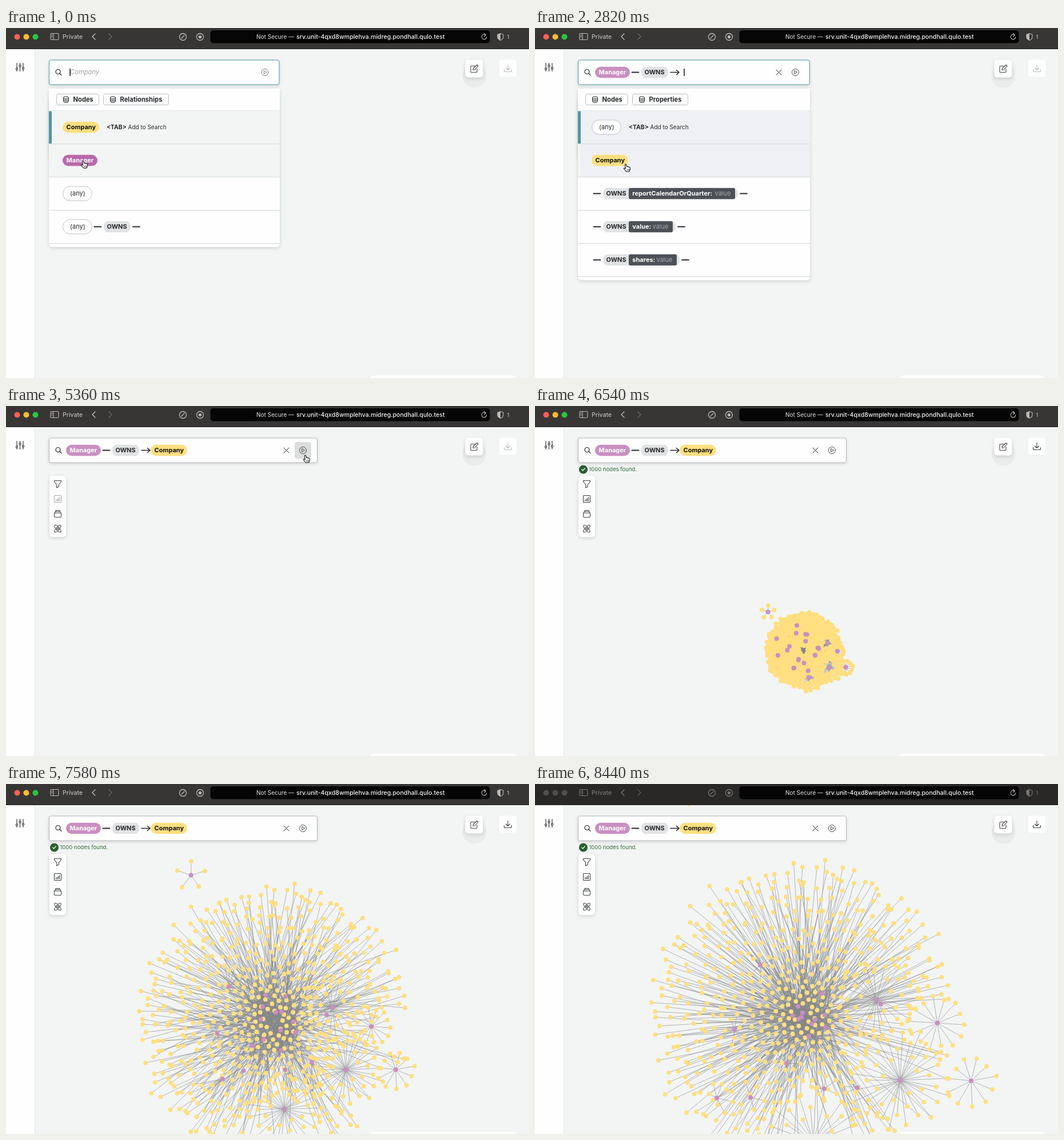
An HTML page with a canvas for the animation above (8.46 s loop, 915 by 612 pixels).

```html
<!DOCTYPE html>
<html lang="en">
<head>
<meta charset="utf-8">
<title>Graph search</title>
<style>
  html, body { margin: 0; width: 100%; height: 100%; overflow: hidden; background: #f3f5f5; }
  canvas { display: block; }
</style>
</head>
<body>
<canvas id="stage" width="915" height="612"></canvas>
<script>
const ctx = document.getElementById('stage').getContext('2d');
const LOOP = 8460, STEP = 148.6, BLUR_AT = 8440;
const INK = '#25282b', TEAL = '#4f97a3', YELLOW = '#ffdf80', PURPLE = '#ca8fc1', GREY = '#e0e2e4';
const ADD_REL = 6, ADD_TARGET = 16, ADD_LAST = 26, CLOSE = 34, FOUND = 42, SPREAD = 49;
const TAU = Math.PI * 2, GOLDEN = Math.PI * (3 - Math.sqrt(5));
const mix = (a, b, u) => a + (b - a) * u;

// ---------- drawing helpers ----------
function box(x, y, w, h, r, fill, stroke) {
  ctx.beginPath();
  ctx.roundRect(x, y, w, h, r);
  if (fill) { ctx.fillStyle = fill; ctx.fill(); }
  if (stroke) { ctx.strokeStyle = stroke; ctx.lineWidth = 1; ctx.stroke(); }
}
function card(x, y, w, h, r) {
  ctx.save();
  ctx.shadowColor = 'rgba(0,0,0,.15)';
  ctx.shadowBlur = 6;
  ctx.shadowOffsetY = 2;
  box(x, y, w, h, r, '#fefefe');
  ctx.restore();
}
function disc(x, y, r, fill) {
  ctx.beginPath();
  ctx.arc(x, y, r, 0, TAU);
  ctx.fillStyle = fill;
  ctx.fill();
}
function icon(x, y, d, stroke, width = 1.1, fill) {
  const p = new Path2D(d);
  ctx.save();
  ctx.translate(x, y);
  ctx.lineCap = ctx.lineJoin = 'round';
  if (fill) { ctx.fillStyle = fill; ctx.fill(p); }
  if (stroke) { ctx.strokeStyle = stroke; ctx.lineWidth = width; ctx.stroke(p); }
  ctx.restore();
}
function text(s, x, y, color = INK, font = 'bold 11px') {
  ctx.font = font + ' Inter, sans-serif';
  ctx.fillStyle = color;
  ctx.textBaseline = 'middle';
  ctx.fillText(s, x, y + .5);
}
const ring = r => `M${r} 0A${r} ${r} 0 1 1 ${-r} 0A${r} ${r} 0 1 1 ${r} 0`;

// ---------- search tokens ----------
function pill(x, y, label, w, fill, color) {
  box(x, y - 9.7, w, 19.4, 9.7, fill);
  text(label, x + 6.5, y, color);
}
const manager = (x, y, fill = PURPLE) => pill(x, y, 'Manager', 61, fill, '#fff');
const company = (x, y, fill = YELLOW) => pill(x, y, 'Company', 64, fill, '#111');
function anyNode(y) {
  box(99.5, y - 12.5, 51, 25, 12.5, '#fff', '#bcc0c3');
  text('(any)', 112, y, INK, '11px');
}
const dash = (x, y) => icon(x, y, 'M.5 0H12.5', INK, 1.8);
const arrow = (x, y) => icon(x, y, 'M.5 0H15M11-4L15.5 0L11 4', INK, 1.6);
function relation(x, y, label, w, end, fill = GREY) {
  dash(x, y);
  icon(x + 17, y, `M5-9H${w - 5}L${w - 1}-4V4L${w - 5} 9H5L1 4V-4Z`, fill, 1.5, fill);
  text(label, x + 22.5, y);
  end(x + w + 20.5, y);
}
function property(x, y, w, name) {
  box(x, y - 9.7, w, 19.4, 3, '#4d5057');
  text(name, x + 6.3, y, '#fff');
  text('value', x + w - 35.5, y, '#a4a7ab', '11px');
}
function ownsProperty(y, w, name) {
  relation(102, y, 'OWNS', w, dash);
  property(164, y, w - 50, name);
}
function nodeProperty(y, token, w, fill, boxX, name) {
  text('Abc', 157, y - 18, '#6d7074', '10px');
  box(99, y - 11, w, 22, 10, fill);
  token(99, y, fill);
  property(boxX, y, 99 + w - 6 - boxX, name);
}
function tabHint(x, y) {
  text('<TAB>', x, y, INK, 'bold 10.4px');
  text('Add to Search', x + 37.5, y, INK, '10px');
}

// ---------- dropdown ----------
const TAB_WIDTH = { Nodes: 75, Relationships: 115, Properties: 98 };
function dropdown(right, rows, tabs, shade, shadeX, shadeRight) {
  const bottom = 151 + 58 * rows;
  card(75, 106, right - 75, bottom - 106, [0, 0, 5, 5]);
  let x = 88;
  for (const name of tabs) {
    const w = TAB_WIDTH[name];
    box(x + .5, 115.5, w - 1, 19, 3, '#fff', '#b7bbbe');
    icon(x + 17, 125, 'M-4.5-3.5A4.5 1.8 0 1 1 4.5-3.5A4.5 1.8 0 1 1-4.5-3.5V3.5A4.5 1.8 0 0 0 4.5 3.5V-3.5M-4.5-1A4.5 1.8 0 0 0 4.5-1M-4.5 1.3A4.5 1.8 0 0 0 4.5 1.3', INK, 1);
    text(name, x + 29.5, 125, INK, 'bold 11.2px');
    x += w + 7;
  }
  box(75, 145, right - 75, 116, 0, '#f3f5f5');
  box(shadeX, 145, shadeRight - shadeX, 116, 0, shade);
  for (let i = 0; i <= rows; i++) box(75, 144 + 58 * i, right - 75, 1.3, 0, i ? '#d9dddf' : '#e6e9ea');
  box(75, 145.5, 5, 56.5, 0, TEAL);
}
const rowY = [173.5, 231.5, 289.5, 347.5, 405.5];

function suggestions(k) {
  const [a, b, c, d, e] = rowY;
  if (k < ADD_REL) {
    dropdown(479, 4, ['Nodes', 'Relationships'], '#f3f5f5', 75, 479);
    company(99, a); tabHint(176, a);
    manager(99, b, k < 5 ? '#b969aa' : PURPLE);
    anyNode(c);
    anyNode(d); relation(154, d, 'OWNS', 47, dash);
  } else if (k < ADD_TARGET) {
    dropdown(479, 4, ['Nodes', 'Relationships', 'Properties'], '#eff0f2', 97, 461);
    relation(102, a, '(any)', 38, dash); tabHint(190, a);
    relation(102, b, 'OWNS', 47, arrow, k < 9 ? GREY : '#cfd2d5');
    nodeProperty(c, manager, 191, PURPLE, 157, 'managerName:');
    relation(102, d, '(any)', 38, dash); company(177, d);
  } else if (k < ADD_LAST) {
    dropdown(481, 5, ['Nodes', 'Properties'], '#eff0f3', 80, 481);
    anyNode(a); tabHint(164, a);
    company(99, b, k < 24 ? YELLOW : '#f6d066');
    ownsProperty(c, 236, 'reportCalendarOrQuarter:');
    ownsProperty(d, 127, 'value:');
    ownsProperty(e, 134, 'shares:');
  } else {
    dropdown(545, 4, ['Nodes', 'Relationships', 'Properties'], '#eff0f2', 97, 527);
    relation(102, a, '(any)', 38, dash); tabHint(190, a);
    relation(102, b, 'OWNS', 47, arrow);
    nodeProperty(c, company, 198, YELLOW, 160, 'companyName:');
    relation(102, d, '(any)', 38, dash); manager(177, d);
  }
}

function searchBar(k) {
  const open = k < CLOSE;
  const right = k < ADD_TARGET ? 478 : k < ADD_LAST ? 480.5 : 544.5;
  card(75, 56, right - 75, 43, 3);
  box(75.5, 56, right - 75.5, 43, 3, '#fefefe', open ? TEAL : '#b4b8ba');
  icon(91, 76.5, ring(4) + 'M3 3L6 6', INK, 1.2);
  if (k >= 32 && k < 38) box(right - 39.5, 63, 29, 29, 4, '#dcdddd');
  icon(right - 25, 77.5, ring(6) + 'M-1.8-2.8V2.8L2.8 0Z', k ? '#44484b' : '#7c8083', 1);
  let caretX = 112, phase = 0;
  if (k < ADD_REL) {
    text('Company', 112, 77.5, '#a0a3a5', 'italic 11.2px');
  } else {
    icon(right - 54, 77.5, 'M-4.5-4.5L4.5 4.5M4.5-4.5L-4.5 4.5', INK, 1);
    manager(105, 77.5);
    caretX = 173; phase = 6;
  }
  if (k >= ADD_TARGET) {
    relation(169, 77.5, 'OWNS', 47, arrow);
    caretX = 261; phase = 11;
  }
  if (k >= ADD_LAST) {
    company(253, 77.5);
    caretX = 324; phase = 26;
  }
  if (open && (k - phase) % 8 < 4) box(caretX - .7, 71, 1.5, 13, 0, '#111');
}

// ---------- graph ----------
let seed = 11;
const rand = () => (seed = seed * 16807 % 2147483647) / 2147483647;

// Hubs: packed x, y, then spread x, y. The last ten sit in the core.
const hubs = [
  [386, 391, 394, 317], [390, 443, 349, 429], [439, 483, 318, 549], [454, 455, 377, 548],
  [419, 427, 440, 488], [471, 467, 506, 533], [506, 443, 564, 531], [517, 422, 605, 385],
  [476, 377, 502, 366], [484, 491, 479, 441], [449, 350, 460, 389], [447, 374, 451, 405],
  [476, 399, 468, 400], [426, 415, 466, 408], [480, 378, 484, 419], [514, 420, 490, 412],
  [440, 482, 461, 411], [454, 457, 507, 404], [505, 442, 508, 426]
];
const CORE = 9;
// Satellites: packed x, y, radius, spread x, y, radius, leaf count.
const satellites = [
  [575, 430, 22, 704, 418, 54, 14], [601, 480, 23, 763, 519, 46, 11],
  [550, 481, 48, 639, 518, 92, 42], [545, 405, 38, 597, 377, 72, 32],
  [487, 512, 44, 487, 626, 98, 38], [359, 308, 24, 288, 10, 35, 5]
];
const PACKED = { x: 470, y: 427, r: 120, power: .5 };
const WIDE = { x: 467, y: 401, r: 274, power: .64 };
const coreHub = () => CORE + Math.floor(rand() * (hubs.length - CORE));
const polar = (x, y, a, r) => [x + Math.cos(a) * r, y + Math.sin(a) * r];

const nodes = Array.from({ length: 690 }, (_, i) => {
  const n = {
    angle: i * GOLDEN + (rand() - .5) * .07,
    rank: (i + 8) / 698,
    wobble: .93 + rand() * .1
  };
  const [x, y] = polar(WIDE.x, WIDE.y, n.angle, WIDE.r * n.rank ** WIDE.power * n.wobble);
  const near = hubs.findIndex((h, j) => j < CORE && Math.hypot(x - h[2], y - h[3]) < 30);
  n.links = [coreHub(), near, n.rank < .3 ? coreHub() : -1].filter(h => h >= 0);
  n.free = satellites.every(s => Math.hypot(x - s[3], y - s[4]) > s[5] * .75);
  return n;
}).filter(n => n.free);

const leaves = satellites.flatMap((s, sat) => Array.from({ length: s[6] }, (_, i) => ({
  sat,
  angle: .96 + (s[6] < 15 ? i * TAU / s[6] : i * GOLDEN),
  reach: s[6] < 15 ? .72 + rand() * .28 : Math.sqrt((i + 4) / (s[6] + 3)),
  link: s[6] > 20 && rand() < .3 ? coreHub() : -1
})));

function graph(k) {
  const u = k < SPREAD ? 0 : 1 - (1 - Math.min((k - SPREAD) / 6, 1)) ** 1.7;
  const zoom = k < SPREAD ? mix(.3, 1, (k - FOUND + 1) / (SPREAD - FOUND + 1)) : 1;
  const grow = u ** .3;
  const cx = mix(PACKED.x, WIDE.x, u), cy = mix(PACKED.y, WIDE.y, u);
  const radius = mix(PACKED.r, WIDE.r, grow), power = mix(PACKED.power, WIDE.power, grow);
  const place = ([x, y]) => [cx + (x - cx) * zoom, cy + (y - cy) * zoom];

  const hubAt = hubs.map(h => place([mix(h[0], h[2], u), mix(h[1], h[3], u)]));
  const satAt = satellites.map(s => place([mix(s[0], s[3], u), mix(s[1], s[4], u)]));
  const nodeAt = nodes.map(n => place(polar(cx, cy, n.angle, radius * n.rank ** power * n.wobble)));
  const leafAt = leaves.map(l => {
    const s = satellites[l.sat];
    return polar(...satAt[l.sat], l.angle, mix(s[2], s[5], u) * l.reach * zoom);
  });

  ctx.beginPath();
  const edge = (a, b) => { ctx.moveTo(...a); ctx.lineTo(...b); };
  nodes.forEach((n, i) => n.links.forEach(h => edge(nodeAt[i], hubAt[h])));
  leaves.forEach((l, i) => {
    edge(leafAt[i], satAt[l.sat]);
    if (l.link >= 0) edge(leafAt[i], hubAt[l.link]);
  });
  ctx.strokeStyle = '#858789';
  ctx.lineWidth = .6;
  ctx.stroke();
  for (const p of [...nodeAt, ...leafAt]) disc(...p, 3.9, YELLOW);
  for (const p of [...hubAt, ...satAt]) disc(...p, 4, PURPLE);
}

// ---------- page furniture ----------
function sidePanel(found) {
  card(76, 122, 29, 107, 5);
  const ink = '#3e4245';
  icon(90.5, 136.5, 'M-6-6H6V-4L1.8 1V4.5L-1.8 6.5V1L-6-4Z', ink);
  icon(90.5, 162.5, 'M-5-6H5Q6-6 6-5V5Q6 6 5 6H-5Q-6 6-6 5V-5Q-6-6-5-6M-3 3.5V1.5M-1 3.5V.5M1 3.5V-1M3 3.5V-3', found ? ink : '#a5a8aa');
  icon(90.5, 188.5, 'M-6-1.5H6V4.5Q6 6 4.5 6H-4.5Q-6 6-6 4.5ZM-5-1.5L-4.5-4H4.5L5-1.5M-3.5-4V-6H3.5V-4', ink);
  icon(90.5, 214.5, 'M-5.5-5.5Q-3-8 2-2T5.5 5.5Q3 8-2 2T-5.5-5.5M5.5-5.5Q3-8-2-2T-5.5 5.5Q-3 8 2 2T5.5-5.5' + ring(1.5), ink);
}
function page(found) {
  box(0, 37, 50, 575, 0, '#fefefe');
  box(50, 37, 1, 575, 0, '#e3e7e7');
  icon(24.5, 68.5, 'M-5.5-7V1.4M-5.5 4.6V7M0-7V-3.6M0-.4V7M5.5-7V.4M5.5 3.6V7' +
    'M-7.1 3A1.6 1.6 0 1 0-3.9 3A1.6 1.6 0 1 0-7.1 3M-1.6-2A1.6 1.6 0 1 0 1.6-2A1.6 1.6 0 1 0-1.6-2M3.9 2A1.6 1.6 0 1 0 7.1 2A1.6 1.6 0 1 0 3.9 2', INK);
  disc(819.5, 83.5, 21, '#eaecec');
  card(803.5, 55.5, 31, 31, 5);
  icon(819, 71.5, 'M1-5H-5Q-6-5-6-4V5Q-6 6-5 6H4Q5 6 5 5V0M-2 2L-1.5-1L5-7L7-5L1 1.5Z', '#44484b');
  box(863, 55.5, 30, 29.5, 4, '#fefefe');
  icon(878, 70.5, 'M0-6V3M-3.5-.5L0 3L3.5-.5M-6.5 2V4Q-6.5 6-4.5 6H4.5Q6.5 6 6.5 4V2', found ? '#3e4245' : '#b9bcbe');
  box(638, 608, 254, 4, [3, 3, 0, 0], '#fefefe');
}
function browserBar(blurred) {
  box(0, 0, 915, 37, 0, blurred ? '#2a2827' : '#373635');
  box(0, 36, 915, 1, 0, '#242322');
  ['#fe5f57', '#febc2e', '#28c840'].forEach((c, i) => disc(19.5 + 16 * i, 15.5, 5, blurred ? '#504e4d' : c));
  const ink = blurred ? '#777574' : '#bdbbba', faint = blurred ? '#5b5958' : '#686665';
  icon(85, 15, 'M-5.5-5.5H5.5Q7-5.5 7-4V4Q7 5.5 5.5 5.5H-5.5Q-7 5.5-7 4V-4Q-7-5.5-5.5-5.5M-2-5.5V5.5M-5-3H-4M-5-1H-4M-5 1H-4', ink);
  text('Private', 99, 15.5, ink, '500 10.5px');
  icon(154, 15, 'M2-5L-3 0L2 5', ink, 1.4);
  icon(182, 15, 'M-2-5L3 0L-2 5', faint, 1.4);
  icon(309.5, 15.5, ring(6) + 'M-2.5 2.5L2.5-2.5', ink, 1.3);
  icon(339.5, 15.5, ring(6), ink, 1.3);
  disc(339.5, 15.5, 2.6, ink);
  box(357.5, 4, 489, 22.5, 5, '#050505');
  text('Not Secure —', 438, 15.5, '#c6c6c6', '500 10px');
  text('srv.unit-4qxd8wmplehva.midreg.pondhall.qulo.test', 508, 15.5, '#f4f4f4', '500 10.6px');
  icon(836.5, 15.5, 'M3-3A4.3 4.3 0 1 0 4.3 0M0-6L3-3L0-1', '#b9b9b9');
  icon(865, 15.5, 'M0-6L5-4V0Q5 4 0 6Q-5 4-5 0V-4Z', ink);
  icon(865, 15.5, 'M0-6L-5-4V0Q-5 4 0 6Z', null, 0, ink);
  text('1', 876.5, 15.5, ink, '500 9px');
}

// Pointer stops: step, x, y.
const pointerPath = [
  [0, 137, 238], [4, 138, 239], [7, 138, 239], [14, 139, 243], [16, 139, 243], [19, 161, 244],
  [24, 163, 244], [27, 163, 244], [32, 525, 92], [37, 526, 92], [41, 878, 486], [43, 925, 630]
];
function pointer(k) {
  const i = pointerPath.findIndex(p => p[0] > k);
  if (i < 0) return;
  const [k0, x0, y0] = pointerPath[i - 1], [k1, x1, y1] = pointerPath[i];
  const u = (k - k0) / (k1 - k0);
  const hand = k < 29 || (k > 31 && k < 38);
  const shape = hand
    ? 'M-3.5-5Q-2.5-7-1.3-5L0-1.5Q1.5-2.5 2.2-1Q3.5-1.8 4-.3Q5.5-.7 5.5 1Q5.7 4 4 7H-1.5L-5.5 2Q-5.5.3-3.8 1L-2.5 2Z'
    : 'M-4-7V5L-1.2 2.5L.6 6.8L2.6 6L.8 1.8H4.5Z';
  icon(mix(x0, x1, u), mix(y0, y1, u), shape, '#111', 1.1, '#fff');
  if (hand) icon(mix(x0, x1, u), mix(y0, y1, u), 'M0 3V5M1.8 3V5M3.5 3V5', '#111', .7);
}

function draw(t) {
  const k = Math.floor((t + 15) / STEP);
  const found = k >= FOUND;
  box(0, 0, 915, 612, 0, '#f3f5f5');
  if (found) graph(k);
  page(found);
  sidePanel(found);
  searchBar(k);
  if (found) {
    disc(84.5, 111, 7.6, '#27602c');
    icon(84.5, 111, 'M-2.8 0L-.8 2L2.8-2', '#fff', 1.2);
    text('1000 nodes found.', 94.5, 110.5, '#2f6b35', '9.5px');
  }
  if (k < CLOSE) suggestions(k);
  browserBar(t >= BLUR_AT);
  pointer(k);
}

const start = performance.now();
function tick() {
  draw((performance.now() - start) % LOOP);
  requestAnimationFrame(tick);
}
tick();
</script>
</body>
</html>
```
